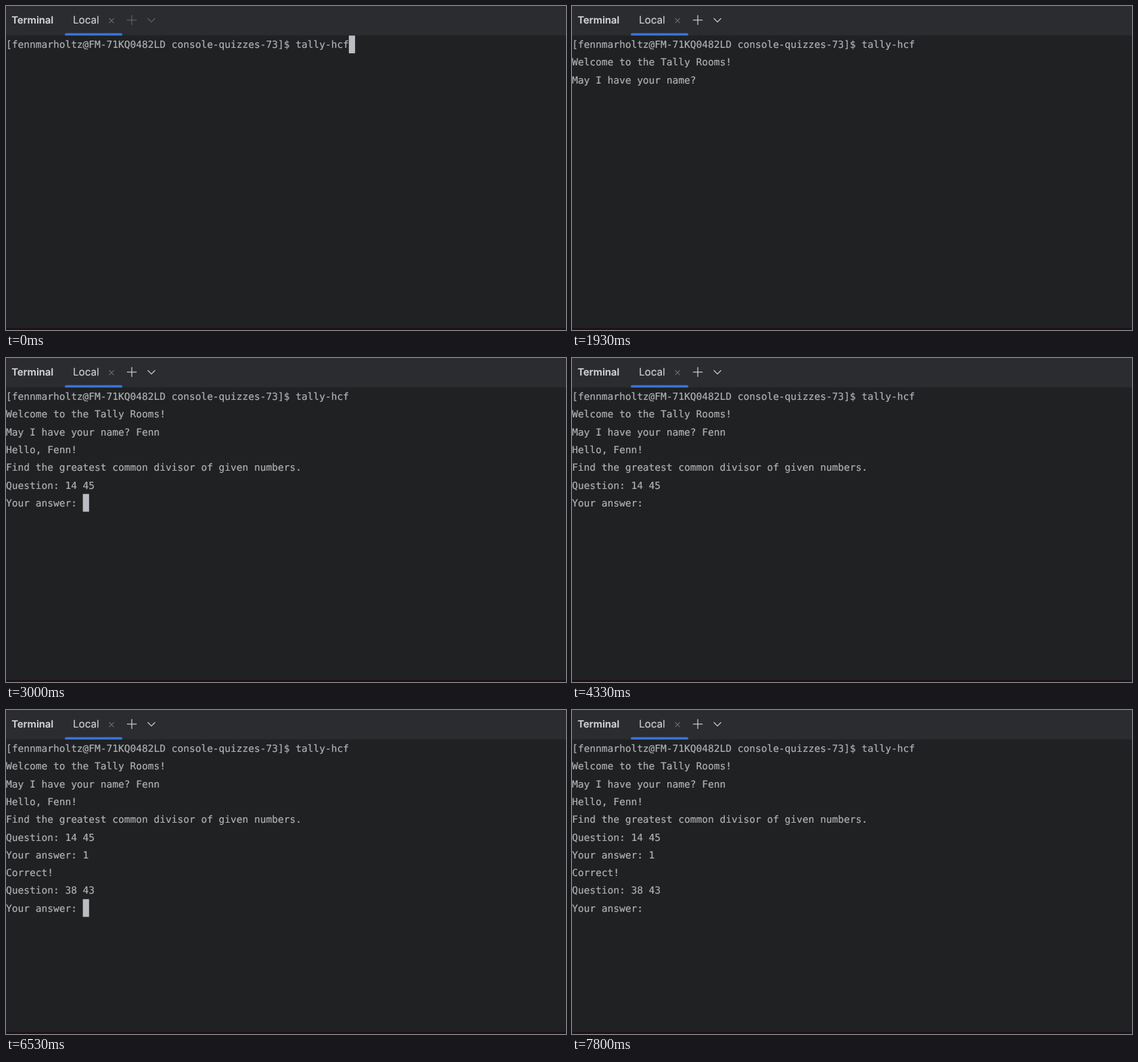
An HTML page with a canvas that plays this animation: 828 px wide and 480 px high, repeating every 8 s.

```html
<!DOCTYPE html>
<html lang="en">
<head>
<meta charset="utf-8">
<style>
  html, body { margin: 0; width: 100%; height: 100%; overflow: hidden; background: #202123; }
  canvas { display: block; }
</style>
</head>
<body>
<canvas id="stage" width="828" height="480"></canvas>
<script>
const ctx = document.getElementById('stage').getContext('2d');
const LOOP = 8000;
const CELL = 8.74, ROW = 26.27, TOP = 43.8;
const MONO = '14.52px "DejaVu Sans Mono", monospace';

// Text appended to the terminal at each time
const output = [
  [0, '[fennmarholtz@FM-71KQ0482LD console-quizzes-73]$ tally-hcf'],
  [1330, '\nWelcome to the Tally Rooms!\nMay I have your name? '],
  [2330, 'F'], [2530, 'e'], [2600, 'n'], [2730, 'n'],
  [2870, '\nHello, Fenn!\nFind the greatest common divisor of given numbers.\nQuestion: 14 45\nYour answer: '],
  [6070, '1'],
  [6270, '\nCorrect!\nQuestion: 38 43\nYour answer: '],
];

// The cursor starts visible and flips at each of these times
const blinks = [470, 930, 1930, 2330, 3270, 3730, 4200, 4670, 5130, 5600, 6733, 7200, 7670];

// A hairline outline gives the text its slightly heavier, softer strokes
function text(str, x, y, font, color, outline = 0.2) {
  ctx.font = font;
  ctx.fillStyle = ctx.strokeStyle = color;
  ctx.lineWidth = outline;
  ctx.fillText(str, x, y);
  ctx.strokeText(str, x, y);
}

function stroke(path, color, width) {
  ctx.strokeStyle = color;
  ctx.lineWidth = width;
  ctx.stroke(new Path2D(path));
}

function drawHeader(t) {
  ctx.fillStyle = '#2b2c30';
  ctx.fillRect(0, 0, 828, 43.5);
  text('Terminal', 8.2, 26.2, '600 14.8px Inter, sans-serif', '#d6d7da', 0.1);
  text('Local', 99, 26.2, '400 15.2px Inter, sans-serif', '#cccdd1');
  stroke('M152.5 18.2l7 7m0-7l-7 7', '#6c6e73', 1.1);

  ctx.globalAlpha = 0.32 + 0.68 * Math.min(1, Math.max(0, (t - 70) / 260));
  stroke('M178.8 20.8h14.4M186 13.6v14.4M209.6 18.2l5.4 5.4 5.4-5.4', '#c6c8cc', 1.3);
  ctx.globalAlpha = 1;

  ctx.fillStyle = '#3873e0';
  ctx.beginPath();
  ctx.roundRect(87, 40.3, 85, 3.5, 1.6);
  ctx.fill();
}

function drawTerminal(t) {
  const lines = output.filter(([at]) => t >= at).map(([, s]) => s).join('').split('\n');
  lines.forEach((line, row) => text(line, 0, TOP + 18.4 + row * ROW, MONO, '#aeb0b4'));

  if (blinks.filter(at => t >= at).length % 2 === 0) {
    const row = lines.length - 1;
    ctx.fillStyle = '#bbbdc2';
    ctx.fillRect(lines[row].length * CELL, TOP + row * ROW, 9.2, ROW);
  }
}

function frame() {
  const t = performance.now() % LOOP;
  ctx.textRendering = 'geometricPrecision';
  ctx.fillStyle = '#202123';
  ctx.fillRect(0, 0, 828, 480);
  drawHeader(t);
  drawTerminal(t);
  ctx.fillStyle = '#1c1218';
  ctx.fillRect(0, 477, 828, 3);
  requestAnimationFrame(frame);
}
frame();
</script>
</body>
</html>
```
